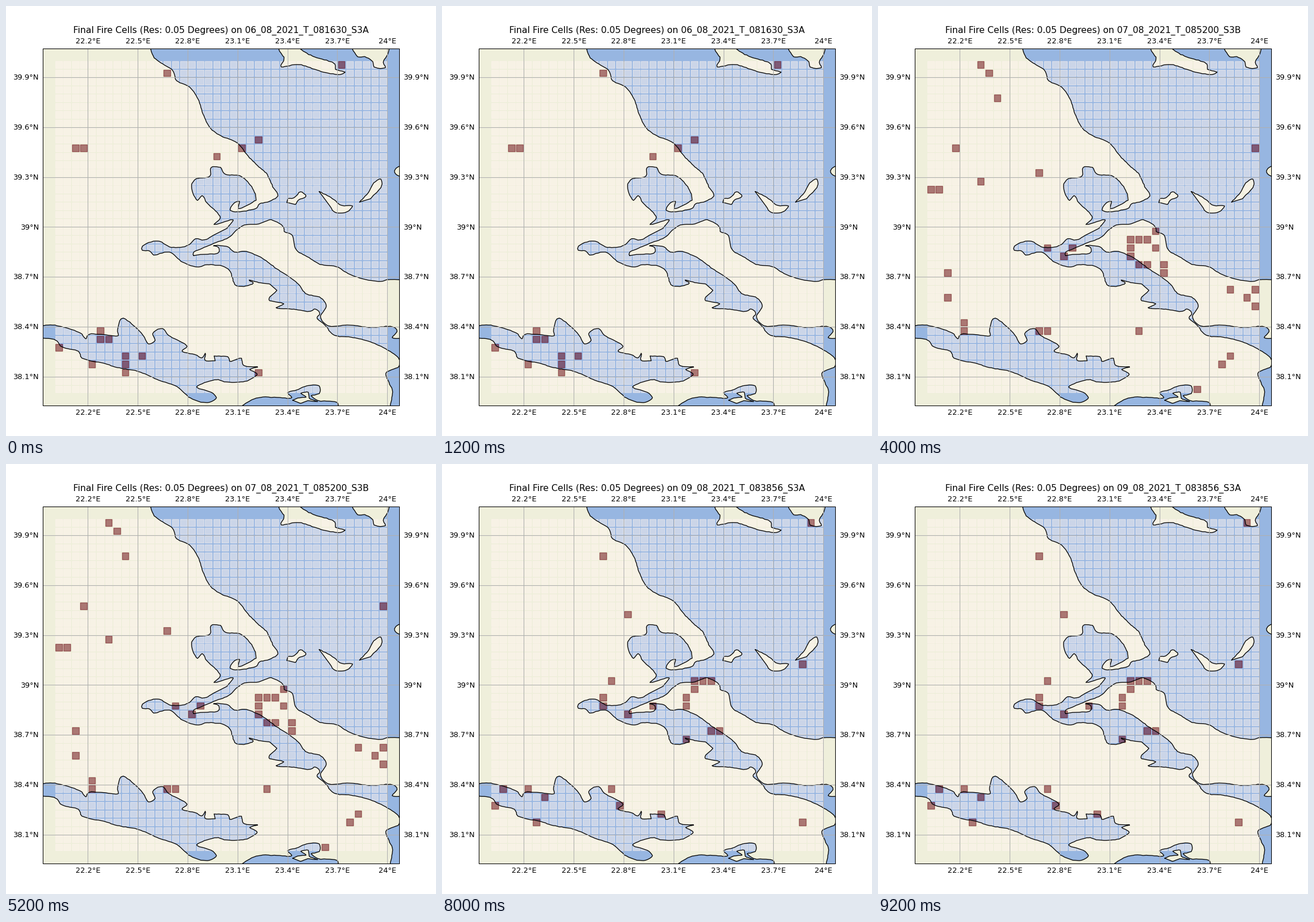
Animation, 748 px wide and 748 px high, one loop 10000 ms. Source, as a matplotlib script:

```python
import numpy as np
import matplotlib.pyplot as plt
from matplotlib.animation import FuncAnimation
from matplotlib.patches import Rectangle

SIZE, DPI = 748, 93.5
LEFT, TOP, SPAN = 63.6, 74.0, 620.6        # map box in pixels
WEST, NORTH, DEGREES = 21.9275, 40.0725, 2.145
SCALE = SPAN / DEGREES
CELLS, STEP = 40, 0.05
LAND = (0.9375, 0.9375, 0.859375)
SEA = (0.59375, 0.71484375, 0.8828125)
rng = np.random.default_rng(5)


def px(lon):
    return LEFT + (lon - WEST) * SCALE


def py(lat):
    return TOP + (NORTH - lat) * SCALE


def coast(*values, rough=0.25, spacing=4):
    """Smooth curve through x, y key points with a slight seeded ripple."""
    p = np.reshape(values, (-1, 2)).astype(float)
    gap = np.hypot(*np.diff(p, axis=0).T)
    t = np.r_[0, np.cumsum(np.sqrt(gap))]
    slope = np.gradient(p, t, axis=0)
    out = []
    for k, length in enumerate(gap):
        h = t[k + 1] - t[k]
        u = np.linspace(0, 1, int(length / spacing) + 2)[:-1, None]
        out.append((1 + 2 * u) * (1 - u) ** 2 * p[k]
                   + u * (1 - u) ** 2 * h * slope[k]
                   + u ** 2 * (3 - 2 * u) * p[k + 1]
                   + u ** 2 * (u - 1) * h * slope[k + 1])
    curve = np.vstack(out + [p[-1:]])
    return curve + rng.normal(0, rough, curve.shape)


pelion = coast(
    249, 68, 258, 90, 273, 101, 290, 112, 297, 130, 319, 141, 334, 162,
    343, 188, 356, 213, 374, 226, 402, 238, 421, 261, 440, 280, 453, 291,
    464, 314, 473, 330, 458, 340, 441, 344, 436, 351, 403, 358, 390, 355,
    399, 341, 406, 340, 404, 352, 419, 347, 435, 338)
pagasetic = coast(
    434, 327, 425, 311, 408, 296, 380, 292, 373, 281, 357, 281, 355, 296,
    331, 301, 323, 310, 325, 325, 333, 338, 341, 330, 350, 343, 367, 359,
    373, 369, 362, 380, 395, 372, 384, 387)
malian = coast(
    360, 399, 345, 407, 330, 405, 317, 416, 288, 420, 264, 409, 237, 418,
    237, 425, 250, 426, 257, 433, 284, 428, 308, 446, 335, 454, 350, 450,
    386, 457, 400, 486, 417, 487, 430, 482, 423, 477, 440, 481, 459, 484)
attica = coast(
    471, 495, 457, 511, 483, 518, 470, 525, 497, 527, 530, 531, 538, 527,
    546, 535, 541, 542, 555, 555, 570, 572, 600, 576, 641, 587, 684, 614,
    684, 626, 661, 639, 666, 655, 672, 668, 668, 700)
open_sea = [(700, 700), (700, 60), (249, 60)]
aegean = np.vstack([pelion, pagasetic, malian, attica, open_sea])

euboea = np.vstack([
    coast(326, 434, 326, 429, 345, 420, 366, 411, 387, 403, 403, 388,
          415, 381, 440, 379, 461, 372, 483, 385, 484, 392, 497, 398,
          505, 424, 524, 436, 546, 449, 577, 454, 592, 464, 619, 474,
          654, 479, 663, 476, 700, 477),
    coast(700, 577, 672, 577, 680, 566, 676, 559, 632, 559, 597, 555,
          560, 556, 547, 541, 557, 522, 548, 508, 521, 500, 509, 484,
          468, 455, 446, 439, 418, 427, 397, 428, 386, 419, 361, 417,
          370, 420, 370, 429, 338, 432)])

corinth = np.vstack([
    coast(50, 557, 81, 555, 111, 562, 132, 571, 139, 579, 143, 572, 165, 571,
          196, 573, 194, 566, 202, 543, 222, 556, 239, 573, 248, 588,
          259, 582, 255, 570, 272, 561, 283, 573, 315, 592, 306, 600,
          328, 606, 341, 612, 347, 604, 346, 616, 364, 617),
    coast(362, 609, 387, 611, 389, 618, 409, 613, 413, 625, 438, 628,
          424, 632, 437, 640, 419, 652, 383, 654, 366, 650, 332, 663,
          357, 672, 366, 681, 350, 690, 321, 682, 297, 662, 266, 651,
          231, 636, 194, 629, 172, 622, 132, 612, 126, 601, 97, 593,
          86, 581, 50, 577)])

saronic = coast(
    405, 705, 412, 695, 440, 681, 497, 681, 490, 673, 506, 668, 527, 660,
    545, 661, 545, 674, 531, 678, 545, 687, 557, 687, 577, 691, 576, 705)
salamis = coast(499, 686, 508, 682, 522, 680, 513, 674, 526, 672, 527, 682,
                542, 688, 525, 687, 512, 691)
kassandra = coast(470, 60, 476, 78, 484, 92, 478, 105, 510, 102, 552, 115,
                  582, 119, 590, 115, 573, 110, 572, 101, 530, 86, 500, 66)
sithonia = coast(595, 60, 612, 88, 624, 88, 638, 97, 640, 106, 660, 107,
                 656, 98, 664, 84, 668, 60)
skiathos = coast(489, 342, 491, 335, 501, 334, 512, 323, 522, 331, 508, 338,
                 504, 345)
skopelos = coast(545, 323, 568, 335, 584, 347, 603, 348, 592, 359, 570, 358,
                 564, 348)
alonissos = coast(615, 341, 630, 325, 640, 308, 652, 301, 653, 313, 634, 335)
islet = coast(700, 279, 681, 280, 676, 289, 684, 296, 700, 300)


def scene(stamp, rows):
    """Pair a title stamp with a 0/1 grid; rows maps row -> burning columns."""
    grid = np.zeros((CELLS, CELLS))
    for row, cols in rows.items():
        grid[row, cols] = 1
    return stamp, grid.ravel()


scenes = [
    scene("06_08_2021_T_081630_S3A", {
        0: [34], 1: [13], 9: [24], 10: [2, 3, 22], 11: [19], 32: [5],
        33: [5, 6], 34: [0], 35: [8, 10], 36: [4, 8], 37: [8, 24]}),
    scene("06_08_2021_T_091811_S3B", {
        19: [6, 11], 22: [5], 30: [4], 32: [2, 3], 33: [1], 39: [4]}),
    scene("07_08_2021_T_085200_S3B", {
        0: [6], 1: [7], 4: [8], 10: [3, 39], 13: [13], 14: [6], 15: [0, 1],
        20: [27], 21: [24, 25, 26], 22: [14, 17, 24, 27], 23: [16, 24],
        24: [25, 26, 28], 25: [2, 28], 27: [36, 39], 28: [2, 38], 29: [39],
        31: [4], 32: [4, 13, 14, 25], 35: [36], 36: [35], 39: [32]}),
    scene("08_08_2021_T_082549_S3B", {
        10: [15], 13: [20], 16: [3], 19: [25, 26], 20: [24, 25, 26],
        21: [26], 22: [23, 24], 23: [24], 24: [28], 25: [28], 26: [28],
        29: [33], 30: [31], 32: [10], 33: [7, 14, 35, 36], 37: [24, 35],
        39: [31]}),
    scene("09_08_2021_T_083856_S3A", {
        0: [38], 4: [13], 11: [16], 17: [37], 19: [14, 24, 25, 26],
        20: [24], 21: [13, 23], 22: [13, 19, 23], 23: [16], 25: [26, 27],
        26: [23], 32: [1, 4, 14], 33: [6], 34: [0, 15], 35: [20],
        36: [5, 37]}),
]

plt.rcParams["font.family"] = "DejaVu Sans"
fig = plt.figure(figsize=(SIZE / DPI, SIZE / DPI), dpi=DPI, facecolor="white")
ax = fig.add_axes([0, 0, 1, 1])
ax.set_xlim(0, SIZE)
ax.set_ylim(SIZE, 0)
ax.axis("off")


def box(**style):
    return ax.add_patch(Rectangle((LEFT, TOP), SPAN, SPAN, **style))


def label(x, y, text, ha="center", size=9.95):
    return ax.text(x, y, text, ha=ha, va="baseline", fontsize=size)


clip = box(fc=LAND, ec="none", zorder=0)


def shore(points, color):
    ring = np.vstack([points, points[:1]])
    fill, = ax.fill(*points.T, color=color, lw=0, zorder=0.5)
    line, = ax.plot(*ring.T, color="black", lw=1, zorder=1.5,
                    solid_joinstyle="round")
    for art in (fill, line):
        art.set_clip_path(clip)


for water in (aegean, corinth, saronic):
    shore(water, SEA)
for land in (euboea, salamis, kassandra, sithonia, skiathos, skopelos,
             alonissos, islet):
    shore(land, LAND)

# Fire cells
offset = (np.arange(CELLS) + 0.5) * STEP
lon, lat = np.meshgrid(22 + offset, 40 - offset)
cells = ax.scatter(px(lon.ravel()), py(lat.ravel()), c=scenes[0][1], s=80,
                   marker="s", cmap="Reds", vmin=0, vmax=1, alpha=0.5,
                   zorder=1)

# Graticule and labels
for k in range(7):
    east, north = 22.2 + 0.3 * k, 38.1 + 0.3 * k
    x, y = px(east), py(north)
    ax.plot([x, x], [TOP, TOP + SPAN], color="#b0b0b0", lw=0.8, zorder=2)
    ax.plot([LEFT, LEFT + SPAN], [y, y], color="#b0b0b0", lw=0.8, zorder=2)
    for base in (65, 711):
        label(x, base, f"{east:.3g}°E")
    for edge, side in ((LEFT - 6.5, "right"), (LEFT + SPAN + 6.5, "left")):
        label(edge, y + 4.4, f"{north:.3g}°N", side)
box(fc="none", ec="black", lw=0.8, zorder=2.5)
title = label(LEFT + SPAN / 2, 47, "", size=11.95)


def update(i):
    stamp, values = scenes[i]
    title.set_text(f"Final Fire Cells (Res: 0.05 Degrees) on {stamp}")
    cells.set_array(values)
    return title, cells


anim = FuncAnimation(fig, update, frames=len(scenes), interval=2000,
                     repeat=True, repeat_delay=0)
plt.show()
```
